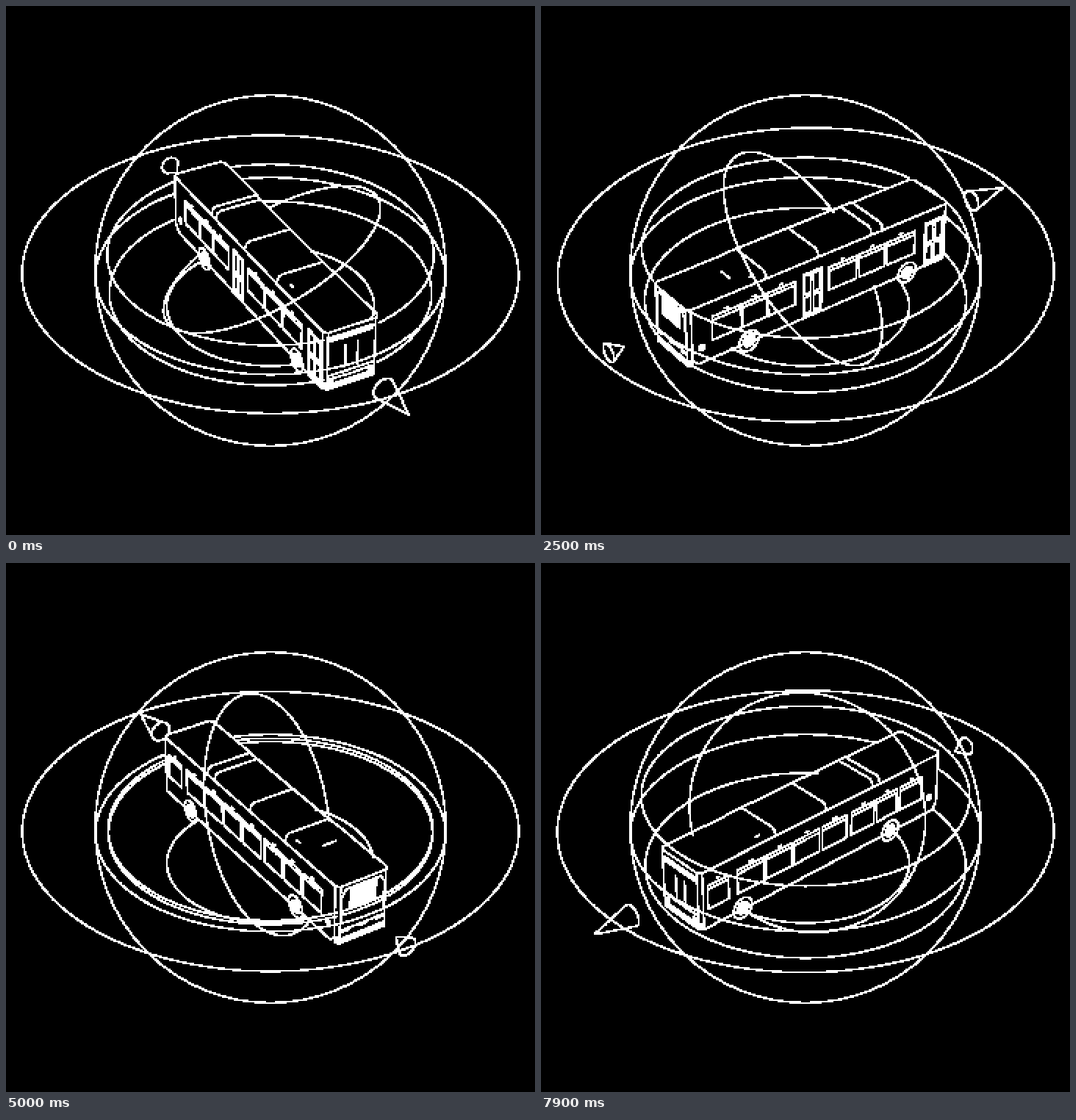
Animation of 720x720 px, one loop 8 s. Source, as an HTML page with a canvas:

```html
<!DOCTYPE html>
<html lang="en">
<head>
<meta charset="utf-8">
<title>Bus and orbits</title>
<style>
  html, body { margin: 0; width: 100%; height: 100%; overflow: hidden; background: #000; }
  canvas { display: block; width: 720px; height: 720px; image-rendering: pixelated; }
</style>
</head>
<body>
<canvas id="stage" width="360" height="360"></canvas>
<script>
const SIZE = 360, LOOP = 8000, STEP = 100, PEN = 0.2;
const CAM = 2600, SIN = 0.5625, COS = Math.sqrt(1 - SIN * SIN);
const LEN = 218, WID = 40, LOW = -43, TOP = 47, HUMP = 54;
const SIDE_END = 213, END_SIDE = 35;

// time in s, heading in degrees, band height, hoop normal (x, up, depth), orbit tilt (x, depth)
const KEYS = [
  [0,   61.7,  31.5, -0.464, 0.877, -0.127, 0.006, -0.001],
  [1.1, 14.8,  56,   0,      0.827, -0.563, -0.025, 0.008],
  [2.5, -36.7, 43,   0.762,  0.643, 0.079, -0.016, 0.038],
  [3.4, -68,   17.5, 0,      0.842, 0.527, 0.004, 0.032],
  [5.0, -122.8, -3,  0.857,  0.397, 0.329, 0, 0.003],
  [6.7, -182,  -43,  0.685, -0.248, -0.685, -0.006, 0.008],
  [7.9, -222,  -57,  0.26,  -0.363, -0.89, -0.004, 0.008]
];

const WINDOWS = {
  door: [[-181, -135], [-133, -93], [-91, -47], [10, 57], [61, 106], [110, 159]],
  plain: [[170, 205], [109, 155], [60, 105], [11, 56], [-39, 6], [-91, -48], [-134, -96], [-183, -140]]
};
const DOORS = [[-34, -3], [177, 210]];
const WHEELS = [147, -123];

const ctx = document.getElementById("stage").getContext("2d");
const image = ctx.createImageData(SIZE, SIZE);
const cells = new Uint32Array(image.data.buffer);
const BLACK = 0xff000000, WHITE = 0xffffffff;

let ch = 1, sh = 0;

// Smooth curve through the key values of one column.
function sample(t, col) {
  const slope = (a, b) => (KEYS[b][col] - KEYS[a][col]) / (KEYS[b][0] - KEYS[a][0]);
  const last = KEYS.length - 1;
  const tangent = i => slope(Math.max(0, i - 1), Math.min(last, i + 1));
  let i = 0;
  while (i < last - 1 && t > KEYS[i + 1][0]) i++;
  const span = KEYS[i + 1][0] - KEYS[i][0], s = (t - KEYS[i][0]) / span;
  const s2 = s * s, s3 = s2 * s;
  return (2 * s3 - 3 * s2 + 1) * KEYS[i][col] + (s3 - 2 * s2 + s) * span * tangent(i) +
    (3 * s2 - 2 * s3) * KEYS[i + 1][col] + (s3 - s2) * span * tangent(i + 1);
}

const mix = (a, b, s) => a.map((v, i) => v + (b[i] - v) * s);
const unit = v => { const l = Math.hypot(...v); return v.map(x => x / l); };
const cross = (a, b) => [a[1] * b[2] - a[2] * b[1], a[2] * b[0] - a[0] * b[2], a[0] * b[1] - a[1] * b[0]];

// Points are [right, up, towards the viewer].
function project([x, y, z]) {
  const s = CAM / (CAM - z * COS - y * SIN);
  return [360 + s * x, 360 - s * (y * COS - z * SIN)];
}

function dot(x, y) {
  x = Math.floor(x);
  y = Math.floor(y);
  if (x >= 0 && y >= 0 && x < SIZE && y < SIZE) cells[y * SIZE + x] = WHITE;
}

// Sweeps a small square pen; every cell it touches lights up.
function line([ax, ay], [bx, by]) {
  const n = Math.max(1, Math.ceil(Math.max(Math.abs(bx - ax), Math.abs(by - ay)) * 2));
  for (let i = 0; i <= n; i++) {
    const x = (ax + (bx - ax) * i / n) / 2, y = (ay + (by - ay) * i / n) / 2;
    dot(x - PEN, y - PEN);
    dot(x + PEN, y - PEN);
    dot(x - PEN, y + PEN);
    dot(x + PEN, y + PEN);
  }
}

const edge = (a, b) => line(project(a), project(b));
function path(pts, closed) {
  for (let i = 1; i < pts.length; i++) edge(pts[i - 1], pts[i]);
  if (closed) edge(pts[pts.length - 1], pts[0]);
}
function fill(a, b, c, d) {
  for (let i = 0; i <= 30; i++) edge(mix(a, d, i / 30), mix(b, c, i / 30));
}

// u forward, v towards the door side, w up
const bus = (u, v, w) => [u * ch - v * sh, w, u * sh + v * ch];

// Does the bus body stand between this point and the viewer?
function hidden([x, y, z]) {
  const pos = [x * ch + z * sh, z * ch - x * sh, y];
  const dir = [COS * sh, COS * ch, SIN];
  const min = [-LEN, -WID, LOW], max = [LEN, WID, TOP + 2];
  let near = 0.5, far = 1e9;
  for (let i = 0; i < 3; i++) {
    const d = Math.abs(dir[i]) < 1e-6 ? 1e-6 : dir[i];
    const p = (min[i] - pos[i]) / d, q = (max[i] - pos[i]) / d;
    near = Math.max(near, Math.min(p, q));
    far = Math.min(far, Math.max(p, q));
  }
  return near < far;
}

function sight(a, b, parts = 1) {
  for (let i = 0; i < parts; i++) {
    const p = mix(a, b, i / parts), q = mix(a, b, (i + 1) / parts);
    if (!hidden(mix(p, q, 0.5))) edge(p, q);
  }
}

function circle(center, normal, r, count) {
  const a = unit(cross(normal, [0, 0, 1])), b = cross(normal, a);
  return Array.from({ length: count }, (_, i) => {
    const t = i / count * 2 * Math.PI;
    return center.map((c, k) => c + r * (a[k] * Math.cos(t) + b[k] * Math.sin(t)));
  });
}
function loop(pts, parts) {
  pts.forEach((p, i) => sight(p, pts[(i + 1) % pts.length], parts));
}
const ring = (height, normal, r) => loop(circle([0, height, 0], unit(normal), r, 240));

function hull(pts) {
  const all = pts.map(p => ({ p, q: project(p) })).sort((a, b) => a.q[0] - b.q[0] || a.q[1] - b.q[1]);
  const turn = (a, b, c) => (b.q[0] - a.q[0]) * (c.q[1] - a.q[1]) - (b.q[1] - a.q[1]) * (c.q[0] - a.q[0]);
  const half = list => {
    const out = [];
    for (const o of list) {
      while (out.length > 1 && turn(out[out.length - 2], out[out.length - 1], o) <= 0) out.pop();
      out.push(o);
    }
    return out.slice(0, -1);
  };
  return half(all).concat(half(all.reverse())).map(o => o.p);
}

function cone(base, tip, r) {
  const foot = Array.from({ length: 28 }, (_, i) => {
    const t = i / 28 * 2 * Math.PI;
    return bus(base, r * Math.cos(t), r * Math.sin(t));
  });
  loop(hull([...foot, bus(tip, 0, 0)]), 6);
  if (sh < 0) loop(foot, 1);
}

const box = (f, a0, a1, b0, b1) => [f(a0, b0), f(a1, b0), f(a1, b1), f(a0, b1)];
const frame = (...args) => path(box(...args), true);
const block = (...args) => fill(...box(...args));

function disc(f, u, w, r, solid) {
  for (let k = r; k > 0; k -= solid ? 1 : r) {
    path(Array.from({ length: 24 }, (_, i) => {
      const t = i / 24 * 2 * Math.PI;
      return f(u + k * Math.cos(t), w + k * Math.sin(t));
    }), true);
  }
}

function drawSide(s) {
  const f = (u, w) => bus(u, s * WID, w);
  path([[-205, LOW], [SIDE_END, LOW], [SIDE_END, TOP], [-SIDE_END, TOP], [-SIDE_END, LOW + 9]]
    .map(p => f(...p)), true);
  for (const [a, b] of s > 0 ? WINDOWS.door : WINDOWS.plain) {
    frame(f, a, b, -14, 23);
    edge(f(a, 17), f(b, 17));
    const m = (a + b) / 2;
    edge(f(m - 3, 28), f(m + 2, 28));
  }
  if (s > 0) for (const [a, b] of DOORS) {
    const m = (a + b) / 2;
    frame(f, a, b, -40, 28);
    for (const [l, r] of [[a + 3, m - 2], [m + 2, b - 3]]) {
      frame(f, l, r, -36, -10);
      frame(f, l, r, -5, 25);
    }
  }
  for (const u of WHEELS) {
    disc(f, u, LOW + 2, 16);
    disc(f, u, LOW + 2, 9, true);
  }
  disc(f, -198, -19, 4, true);
}

function drawEnd(s, near) {
  const f = (v, w) => bus(s * LEN, v, w);
  frame(f, -END_SIDE, END_SIDE, LOW, TOP);
  block(f, -END_SIDE, END_SIDE, LOW, -36);
  const inner = w => f(near * END_SIDE, w), outer = w => bus(s * SIDE_END, near * WID, w);
  fill(inner(LOW), outer(LOW), outer(-34), inner(-34));
  if (s > 0) {
    block(f, -31, 31, 32, 38);
    edge(f(-END_SIDE, -22), f(END_SIDE, -22));
    for (const v of [-9, 9]) edge(f(v, -16), f(v, 19));
    block(f, -34, -26, -33, -28);
    block(f, 26, 34, -33, -28);
  } else {
    block(f, -20, 20, 10, 36);
    path([f(-33, -10), f(-33, 30), f(-27, 40), f(27, 40), f(33, 30), f(33, -10)]);
    edge(f(-END_SIDE, -23), f(END_SIDE, -23));
    for (const v of [-34, -6, 22]) block(f, v, v + 12, -26, -23);
  }
}

function drawRoof(near) {
  const at = (u, v, w = TOP) => bus(u, near * v, w);
  path([
    at(-SIDE_END, WID), at(SIDE_END, WID), at(LEN, END_SIDE), at(LEN, -END_SIDE),
    at(SIDE_END, -WID), at(112, -WID), at(106, -33, HUMP), at(-106, -33, HUMP),
    at(-112, -WID), at(-SIDE_END, -WID), at(-LEN, -END_SIDE), at(-LEN, END_SIDE)
  ], true);
  const rib = u => path([at(u, -32, HUMP), at(u, 29, HUMP), at(u, 34, HUMP - 3), at(u, 36, TOP - 3)]);
  [-91, -5, 85].forEach(rib);
  const away = sh > 0 ? -1 : 1;
  if (Math.abs(sh) > 0.15) rib(away * 104);
  if (sh < 0) edge(bus(-134, -5, 50), bus(-134, 15, 50));
  edge(at(-away * 109 - 4, 27, 50), at(-away * 109 + 4, 27, 50));
}

function draw(ms) {
  const t = ms / 1000;
  const [turn, band, nx, ny, nz, tx, tz] = [1, 2, 3, 4, 5, 6, 7].map(c => sample(t, c));
  const heading = turn * Math.PI / 180;
  ch = Math.cos(heading);
  sh = Math.sin(heading);
  cells.fill(BLACK);

  const near = ch > 0 ? 1 : -1;
  drawRoof(near);
  drawSide(near);
  drawEnd(sh > 0 ? 1 : -1, near);

  const up = [0, 1, 0];
  for (let i = 0; i < 240; i++) {
    const at = k => [360 + 238.5 * Math.cos(k * Math.PI / 120), 360 + 238.5 * Math.sin(k * Math.PI / 120)];
    line(at(i), at(i + 1));
  }
  ring(3.1, up, 237.2);
  ring(4.4 + band, up, 220);
  ring(4.4 - band, up, 220);
  ring(-55, up, 142.5);
  ring(18, [tx, 1, tz], 334.7);
  ring(22, [nx, ny, nz], 165.5);
  cone(298, 357, 15);
  cone(-314, -291, 13);
  ctx.putImageData(image, 0, 0);
}

let shown = -1;
const start = performance.now();
function tick() {
  const ms = Math.floor((performance.now() - start) % LOOP / STEP) * STEP;
  if (ms !== shown) draw(shown = ms);
  requestAnimationFrame(tick);
}
tick();
</script>
</body>
</html>
```
